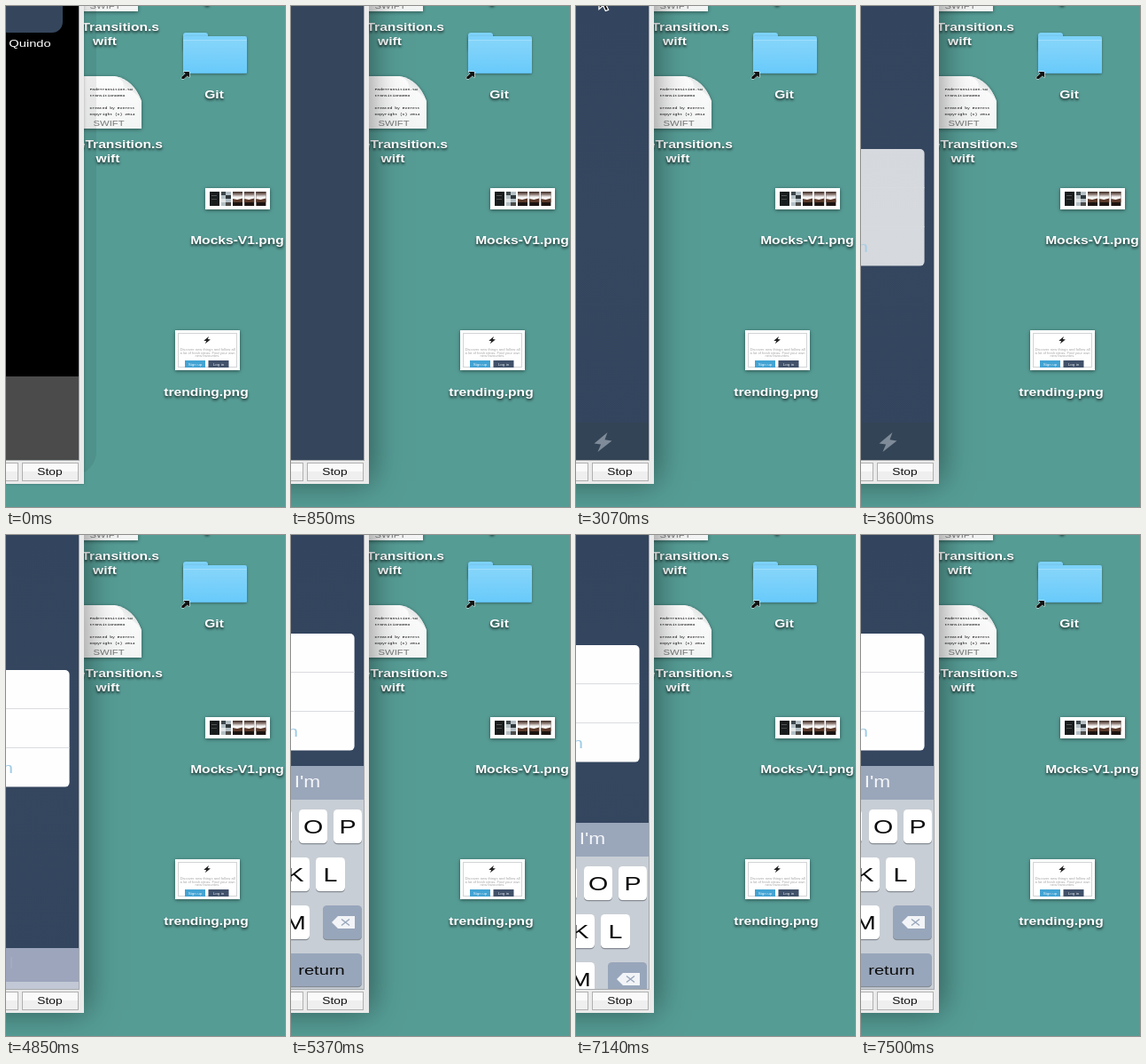
An HTML page with a canvas for the animation above (8 s loop, 315 by 564 pixels).

```html
<!DOCTYPE html>
<html lang="en">
<head>
<meta charset="utf-8">
<title>Simulator on a desktop</title>
<style>
html, body { margin: 0; width: 100%; height: 100%; overflow: hidden; background: #559c95; }
canvas { display: block; width: 100vw; height: 100vh; }
</style>
</head>
<body>
<canvas id="stage"></canvas>
<script>
const W = 315, H = 564, LOOP = 8000;
const VIEW_W = 82, VIEW_H = 511; // visible part of the phone screen
const ASPECT = 1.3;
const SANS = '"Liberation Sans", Arial, sans-serif';
const MONO = '"Liberation Mono", "DejaVu Sans Mono", monospace';
const canvas = document.getElementById('stage');
const dpr = window.devicePixelRatio || 1;
canvas.width = W * dpr;
canvas.height = H * dpr;
const ctx = canvas.getContext('2d');

const lerp = (a, b, p) => a + (b - a) * p;
const clamp = v => Math.min(1, Math.max(0, v));

// Time held at n evenly spaced moments from a to b; below a it is -Infinity.
function stepped(t, a, b, n) {
  if (t < a) return -Infinity;
  const gap = (b - a) / (n - 1);
  return Math.min(b, a + Math.floor((t - a) / gap + 0.08) * gap);
}

// Critically damped move that begins just before the first visible step.
function spring(t, a, b, n) {
  const now = stepped(t, a, b, n);
  if (now < a) return 0;
  const rest = ms => 1 - (1 + ms * 0.0105) * Math.exp(-ms * 0.0105);
  return rest(now - a + 73) / rest(b - a + 73);
}

function rect(x, y, w, h, fill) {
  ctx.fillStyle = fill;
  ctx.fillRect(x, y, w, h);
}

function round(x, y, w, h, r, fill) {
  ctx.fillStyle = fill;
  ctx.beginPath();
  ctx.roundRect(x, y, w, h, r);
  ctx.fill();
}

function poly(points, fill) {
  ctx.fillStyle = fill;
  ctx.beginPath();
  points.forEach(([x, y]) => ctx.lineTo(x, y));
  ctx.closePath();
  ctx.fill();
}

function vertical(y0, y1, ...colors) {
  const g = ctx.createLinearGradient(0, y0, 0, y1);
  colors.forEach((c, i) => g.addColorStop(i / (colors.length - 1), c));
  return g;
}

function text(s, x, y, size, fill, { align = 'center', weight = '', font = SANS } = {}) {
  ctx.save();
  ctx.translate(x, y);
  ctx.scale(ASPECT, 1);
  ctx.font = `${weight} ${size}px ${font}`;
  ctx.textAlign = align;
  ctx.fillStyle = fill;
  ctx.fillText(s, 0, 0);
  ctx.restore();
}

function shadow(color, blur, dx = 0, dy = 0) {
  ctx.shadowColor = color;
  ctx.shadowBlur = blur * dpr;
  ctx.shadowOffsetX = dx * dpr;
  ctx.shadowOffsetY = dy * dpr;
}

function label(s, x, y, align) {
  ctx.save();
  shadow('rgba(0,0,0,.75)', 3, 0, 1.5);
  text(s, x, y, 12, '#fff', { align, weight: 'bold' });
  ctx.restore();
}

function bolt(x, y, k, fill) {
  const shape = [[15, 0], [0, 12.4], [7.6, 13.6], [4, 22], [20, 9.4], [12, 8.2]];
  poly(shape.map(([px, py]) => [x + px * k, y + py * k]), fill);
}

// ---- desktop ----

function swiftFile(x, y) {
  ctx.save();
  ctx.translate(x, y);
  ctx.save();
  shadow('rgba(0,0,0,.45)', 4, 0, 1);
  ctx.fillStyle = vertical(0, 59, '#fdfdfd', '#f3f4f4');
  ctx.beginPath();
  ctx.moveTo(0, 0);
  ctx.lineTo(38, 0);
  ctx.quadraticCurveTo(59, 4, 68, 28);
  ctx.lineTo(68, 59);
  ctx.lineTo(0, 59);
  ctx.fill();
  ctx.restore();
  const curl = ctx.createLinearGradient(46, 20, 60, 6);
  curl.addColorStop(0, '#fff');
  curl.addColorStop(1, '#dcdfdf');
  ctx.fillStyle = curl;
  ctx.beginPath();
  ctx.moveTo(38, 0);
  ctx.quadraticCurveTo(49, 4, 48, 14);
  ctx.quadraticCurveTo(60, 15, 68, 28);
  ctx.quadraticCurveTo(59, 4, 38, 0);
  ctx.fill();
  const lines = ['FadeTransition.sw', 'transitionDemo', '', 'Created by Everett', 'Copyright (c) 2014'];
  lines.forEach((s, i) => text(s, 9.5, 15.5 + i * 7, 3.65, '#000', { align: 'left', font: MONO }));
  text('SWIFT', 31, 55.5, 8.7, '#777');
  ctx.restore();
}

function folder() {
  ctx.save();
  shadow('rgba(0,0,0,.35)', 3, 0, 1);
  round(200, 30, 28, 20, 3, '#7dd2fb');
  round(200, 34, 72, 42, 2, '#7dd2fb');
  ctx.restore();
  round(200, 38, 72, 38, 2, vertical(38, 76, '#86d5fa', '#68cafa'));
  rect(200, 38, 72, 1, '#a0defc');
  rect(201, 75, 70, 1, '#5fbbea');
  const arrow = [[200, 74], [207, 74], [207, 80.5], [204.8, 78.4], [201, 82], [198.3, 82],
    [198.3, 79.8], [202.6, 76.2]];
  ctx.strokeStyle = '#fff';
  ctx.lineWidth = 1;
  poly(arrow, '#111');
  ctx.stroke();
  ctx.fill();
}

function frame(x, y, w, h) {
  ctx.save();
  shadow('rgba(0,0,0,.5)', 4, 0, 1);
  rect(x, y, w, h, '#fff');
  ctx.restore();
}

function mocks() {
  frame(225, 205, 73, 24);
  rect(230, 209, 11, 16, '#1a1d1d');
  rect(232, 213, 6, 1, '#555');
  rect(232, 217, 6, 1, '#4a4a4a');
  rect(243, 209, 11, 16, '#b4c0c6');
  rect(243, 209, 5, 4, '#3f484c');
  rect(248, 213, 6, 4, '#30383c');
  rect(243, 217, 5, 4, '#e1e5e6');
  rect(248, 221, 6, 4, '#4d4c49');
  for (let i = 0; i < 3; i++) {
    const x = 256 + i * 13.2;
    rect(x, 209, 11, 16, '#1c1412');
    rect(x, 209, 11, 9, vertical(209, 218, '#392923', '#8a7770', '#f3f2f1', '#fff'));
    poly([[x, 217], [x + 5, 218], [x + 11, 216.5], [x + 11, 221], [x, 221]], '#5b3a2b');
  }
}

function trending() {
  frame(191, 365, 73, 45);
  ctx.strokeStyle = '#d2d4d6';
  ctx.lineWidth = 1;
  ctx.strokeRect(194.5, 368.5, 66, 38);
  bolt(223.3, 372, 0.38, '#222');
  text('Discover new things and follow all', 227.5, 387.5, 3.2, '#a4a4a4');
  text('a lot of fresh ideas. Find your own', 227.5, 391.5, 3.2, '#a4a4a4');
  text('new favourites.', 227.5, 395.3, 3.2, '#a4a4a4');
  rect(202, 399, 23, 8, '#43a3d3');
  rect(228.5, 399, 23, 8, '#40516a');
  text('Sign up', 213.5, 404.5, 3.5, '#e6f3fa');
  text('Log in', 240, 404.5, 3.5, '#e1e5ea');
}

function desktop() {
  rect(0, 0, W, H, '#559c95');
  swiftFile(81, -53);
  swiftFile(85, 79);
  label('FadeTransition.s', 173, 28, 'right');
  label('wift', 111.5, 44);
  label('FadeTransition.s', 177, 160, 'right');
  label('wift', 115, 176);
  folder();
  ctx.save();
  shadow('rgba(0,0,0,.7)', 3, 0, 1);
  round(224.5, -3, 5, 3, 1, '#fff');
  ctx.restore();
  label('Git', 235, 104);
  mocks();
  label('Mocks-V1.png', 261, 268);
  trending();
  label('trending.png', 226, 439);
}

// ---- simulator window ----

function windowFrame(active) {
  ctx.save();
  if (active) {
    shadow('rgba(0,0,0,.46)', 34, 2, -3);
    rect(-120, -120, 208, 658, '#ebebeb');
  } else {
    round(-20, -20, 122, 548, 26, 'rgba(0,0,0,.07)');
    shadow('rgba(0,0,0,.25)', 3);
    rect(-20, -20, 108, 558, '#ebebeb');
  }
  ctx.restore();
  rect(0, 0, 88, 538, '#ebebeb');
  rect(VIEW_W, 0, 1, VIEW_H + 1, '#a6a9ac');
  rect(0, VIEW_H, VIEW_W, 1, '#a6a9ac');
  button(-40, 54);
  button(18, 64);
  text('Stop', 49.5, 528, 10.6, '#111');
}

function button(x, w) {
  rect(x, 514, w, 21, '#b0b0b0');
  rect(x + 1, 515, w - 2, 19, '#efefef');
  rect(x + 1, 515, w - 2, 9, '#fafafa');
}

function home(zoom) {
  rect(0, 0, VIEW_W, VIEW_H, '#000');
  ctx.save();
  ctx.translate(27, 2);
  ctx.scale(zoom, zoom);
  ctx.translate(-27, -2);
  rect(-400, 417, 482, 200, '#4b4b4b');
  round(-10, -27, 74, 57, 12, '#35465c');
  text('Quindo', 27, 46, 11.3, '#fff');
  ctx.restore();
}

function launch(p) {
  home(1 + p * 2.2);
  const x = lerp(-10, -334, p), y = lerp(-27, -52, p);
  round(x, y, lerp(64, VIEW_W, p) - x, lerp(30, VIEW_H, p) - y, 12 * (1 - p), '#35465c');
}

function card(y) {
  round(-60, y, 131.6, 131.6, 5, '#fefefe');
  rect(0, y + 43, 71.6, 1, '#d9dcdf');
  rect(0, y + 87, 71.6, 1, '#d9dcdf');
  text('Log in', 8, y + 115.5, 17, '#9ecbe6', { align: 'right' });
}

function key(s, x, y, w, h = 38, fill = '#fff', size = 22) {
  round(x, y + 1.3, w, h, 4.5, '#858b93');
  round(x, y, w, h, 4.5, fill);
  if (s) text(s, x + w / 2, y + h / 2 + size * 0.36, size, '#0c0c0c');
}

function keyboard(y, p) {
  const gray = '#98a6bb';
  const entering = p < 0.3;
  ctx.save();
  ctx.translate(0, y);
  rect(0, 0, VIEW_W, 38, entering ? '#9ca5bc' : '#9aa6ba');
  rect(0, 38, VIEW_W, 213, entering ? '#c3c8d6' : '#c8ced5');
  if (entering) {
    rect(5.5, 10, 1, 13, '#a9b2c6');
  } else {
    text("I'm", 18.5, 23.5, 17.5, '#f3f5f8');
  }
  key('I', -30, 49, 31);
  key('O', 9, 49, 32);
  key('P', 48, 49, 32);
  key('K', -11, 103, 32);
  key('L', 28, 103, 33);
  key('M', -11, 157, 32);
  key('', 36, 157, 44, 38, gray);
  poly([[46, 176], [53, 169], [72, 169], [72, 183], [53, 183]], '#f2f4f7');
  ctx.strokeStyle = gray;
  ctx.lineWidth = 1.4;
  ctx.beginPath();
  ctx.moveTo(57, 172.5);
  ctx.lineTo(66, 179.5);
  ctx.moveTo(66, 172.5);
  ctx.lineTo(57, 179.5);
  ctx.stroke();
  key('return', -11, 211, 91, 37, gray, 15.5);
  ctx.restore();
}

function cursor(x, y) {
  const shape = [[0, 0], [0, 16], [4.6, 12], [7.4, 18], [10.6, 16.8], [7.8, 11], [14, 11]];
  poly(shape.map(([px, py]) => [x + px, y + py]), '#111');
  ctx.strokeStyle = '#fff';
  ctx.lineWidth = 1.3;
  ctx.stroke();
}

function app(t) {
  const ready = t < 1480 ? 0 : t < 1570 ? 0.5 : 1;
  rect(0, 0, VIEW_W, VIEW_H, '#35465c');
  ctx.globalAlpha = ready;
  rect(0, 0, VIEW_W, VIEW_H, vertical(0, VIEW_H, '#33445e', '#35465f', '#33445e'));
  rect(0, 469, VIEW_W, 42, '#334456');
  ctx.globalAlpha = 1;
  if (t >= 1740) bolt(20.5, 480, 1, '#7f8b99');

  const raised = spring(t, 4850, 5370, 7) - spring(t, 6090, 6530, 6) + spring(t, 6970, 7500, 7);
  ctx.globalAlpha = clamp((stepped(t, 3330, 3680, 5) - 3240) / 440);
  if (ctx.globalAlpha > 0) card(Math.round(161 - 50 * raised));
  ctx.globalAlpha = 1;
  if (raised > 0.001) keyboard(Math.round(VIEW_H - 251 * raised), raised);

  if (t >= 2630 && t < 3330) {
    const p = clamp((stepped(t, 2630, 3070, 6) - 2630) / 440);
    const eased = 1 - (1 - p) ** 2;
    cursor(lerp(-6, 26, eased), lerp(46, -12.5, eased));
  }
}

function screen(t) {
  ctx.save();
  ctx.beginPath();
  ctx.rect(0, 0, VIEW_W, VIEW_H);
  ctx.clip();
  if (t < 500) home(1);
  else if (t < 850) launch([0.3, 0.76, 0.97][Math.min(2, Math.floor((t - 500) / 90))]);
  else app(t);
  ctx.restore();
}

function draw(now) {
  const t = now % LOOP;
  ctx.setTransform(dpr, 0, 0, dpr, 0, 0);
  desktop();
  windowFrame(t >= 850);
  screen(t);
}

const begin = performance.now();
function tick() {
  draw(performance.now() - begin);
  requestAnimationFrame(tick);
}
tick();
</script>
</body>
</html>
```
